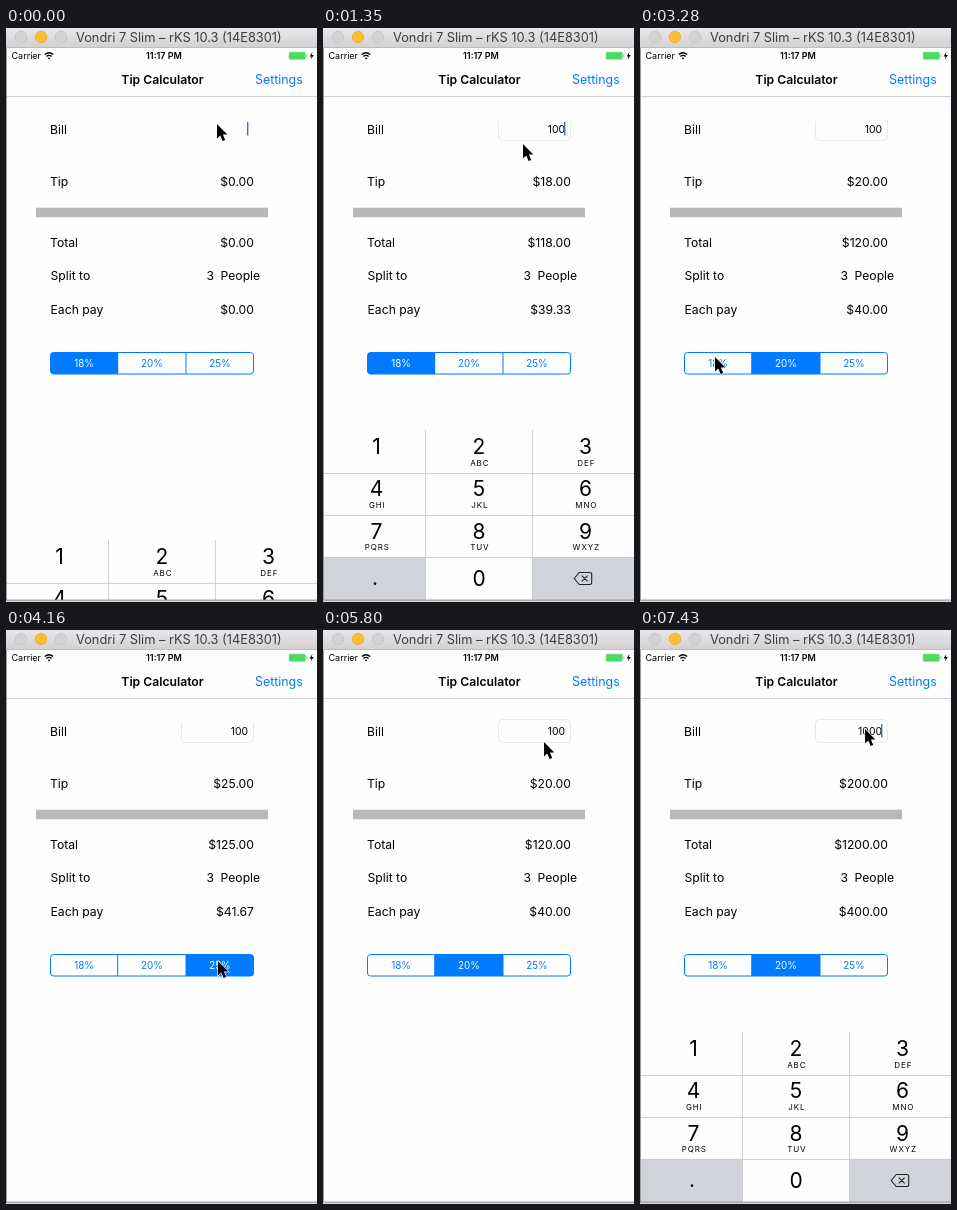
Recreate the animation shown at these times as an HTML page. Size 311x574 px, loop 8000 ms.

```html
<!DOCTYPE html>
<html lang="en">
<head>
<meta charset="utf-8">
<title>Tip Calculator</title>
<style>
  html, body { margin: 0; height: 100%; overflow: hidden; background: #fff; }
  svg { display: block; width: 100vw; height: 100vh; }
  text { font: 12.2px Inter, "Liberation Sans", sans-serif; fill: #000; white-space: pre; }
  .end { text-anchor: end; }
  .mid { text-anchor: middle; }
  text.bold { font-weight: 600; }
  text.digit { font-size: 21px; }
  text.letters { font-size: 8px; letter-spacing: .9px; }
  text.small { font-size: 9px; }
  text.seg { font-size: 9.8px; }
  .rule { stroke: #c6c6c9; stroke-width: .8; }
</style>
</head>
<body>
<svg viewBox="0 0 311 574">
  <defs>
    <linearGradient id="chrome" x2="0" y2="1">
      <stop stop-color="#e9e7e9"/><stop offset="1" stop-color="#d2d0d2"/>
    </linearGradient>
    <clipPath id="screen"><rect x="1" y="20" width="310" height="552"/></clipPath>
    <clipPath id="fieldClip"><rect id="fieldArea" width="80" height="40"/></clipPath>
    <clipPath id="segClip"><rect x="44.5" y="324.5" width="203" height="21.5" rx="3"/></clipPath>
  </defs>

  <rect width="311" height="574" fill="#fefefe"/>
  <rect width="311" height="19.5" fill="url(#chrome)"/>
  <path d="M0 19.5H311" stroke="#b5b3b5" stroke-width=".8"/>
  <g stroke-width=".6">
    <circle cx="15" cy="9" r="5.8" fill="#d4d2d4" stroke="#bebcbe"/>
    <circle cx="35" cy="9" r="5.8" fill="#fdbd30" stroke="#dfa023"/>
    <circle cx="55" cy="9" r="5.8" fill="#d4d2d4" stroke="#bebcbe"/>
  </g>
  <text x="70" y="14" style="font-size:12.8px;fill:#3f3f3f">Vondri 7 Slim – rKS 10.3 (14E8301)</text>

  <text class="small" x="5.5" y="31">Carrier</text>
  <g fill="none" stroke="#000" stroke-width="1.3">
    <path d="M38.8 26.6Q43 22.8 47.2 26.6M40.4 28.6Q43 26.2 45.6 28.6"/>
    <path d="M43 31.4L41.7 30Q43 29 44.3 30Z" fill="#000" stroke="none"/>
  </g>
  <text class="small mid bold" x="158" y="31">11:17 PM</text>
  <rect x="283" y="24" width="16.5" height="7.5" rx="1.3" fill="#4cd964" stroke="#a7dfb1" stroke-width=".6"/>
  <rect x="300.2" y="26.2" width="1.2" height="3" fill="#8fcf9b"/>
  <path d="M306.4 24L303.6 28.4H305.5L304.8 31.5L307.8 27H305.8Z"/>

  <text class="mid bold" x="156.5" y="56">Tip Calculator</text>
  <text x="249" y="56" style="font-size:12.4px;fill:#007aff">Settings</text>
  <path class="rule" d="M1 68.5H311"/>

  <text x="44" y="106">Bill</text>
  <text x="44" y="158">Tip</text>
  <text x="44" y="218.5">Total</text>
  <text x="44.5" y="251.5">Split to</text>
  <text x="44.5" y="286">Each pay</text>
  <text x="200.5" y="251.5">3</text>
  <text x="214.5" y="251.5">People</text>
  <rect x="30" y="179.7" width="232" height="9.6" fill="#b8b8b8"/>

  <rect x="175.5" y="89.5" width="72" height="23" rx="4" fill="none" stroke="#e9e9e9" clip-path="url(#fieldClip)"/>
  <text id="bill" class="end" x="242" y="104.5" style="font-size:10.4px"></text>
  <rect id="caret" x="241" y="94" width="1.4" height="13.5" fill="#426bd8"/>
  <text id="tip" class="end" x="248" y="158"></text>
  <text id="total" class="end" x="248" y="218.5"></text>
  <text id="each" class="end" x="248" y="285.5"></text>

  <g id="segments" clip-path="url(#segClip)"></g>
  <path d="M111.7 324.5V346M180 324.5V346" stroke="#007aff"/>
  <rect x="44.5" y="324.5" width="203" height="21.5" rx="3" fill="none" stroke="#007aff"/>

  <g clip-path="url(#screen)"><g id="keypad">
    <rect y="402" width="311" height="172" fill="#fefefe"/>
    <path d="M1 529.5H102.5V574H1ZM209.5 529.5H311V574H209.5Z" fill="#d1d4db"/>
    <path class="rule" fill="none" d="M1 445.5H311M1 487.5H311M1 529.5H311M102.5 402V574M209.5 402V574"/>
    <path d="M256.2 544.5H267Q268.7 544.5 268.7 546.2V554.8Q268.7 556.5 267 556.5H256.2L251.2 550.5ZM258.8 547.6L264.6 553.4M264.6 547.6L258.8 553.4" fill="none" stroke="#222" stroke-width="1.1" stroke-linejoin="round"/>
  </g></g>

  <path d="M.5 20V572" stroke="#9b9b9b"/>
  <rect y="571.6" width="311" height="1.2" fill="#8c8c8c"/>
  <rect y="572.8" width="311" height="1.2" fill="#d8d8d8"/>

  <path id="mouse" d="M0 0V14.5L3.3 11.4L5.6 17L8.2 15.9L5.9 10.6H10.3Z" stroke="#fff" stroke-width="1.2" paint-order="stroke"/>
</svg>
<script>
const LOOP = 8000, TICK = 148.7;
const RATES = [18, 20, 25];
const $ = id => document.getElementById(id);

function add(parent, tag, attrs, label = '') {
  const el = document.createElementNS('http://www.w3.org/2000/svg', tag);
  for (const name in attrs) el.setAttribute(name, attrs[name]);
  el.textContent = label;
  return parent.appendChild(el);
}

const segments = RATES.map((rate, i) => {
  const x = 44 + i * 68;
  return {
    box: add($('segments'), 'rect', { x, y: 324, width: 68, height: 23 }),
    label: add($('segments'), 'text', { class: 'seg mid', x: x + 34, y: 339 }, rate + '%')
  };
});

const LETTERS = ['', 'ABC', 'DEF', 'GHI', 'JKL', 'MNO', 'PQRS', 'TUV', 'WXYZ'];
const columnX = [53.5, 156, 262.5];
LETTERS.forEach((letters, i) => {
  const x = columnX[i % 3], y = 426 + Math.floor(i / 3) * 42.3;
  add($('keypad'), 'text', { class: 'digit mid', x, y }, i + 1);
  add($('keypad'), 'text', { class: 'letters mid', x: x + .8, y: y + 11.6 }, letters);
});
add($('keypad'), 'text', { class: 'digit mid', x: 156, y: 558 }, '0');
add($('keypad'), 'text', { class: 'digit mid', x: 52, y: 556.5 }, '.');

// Keys are [tick, value, ...]; stepped tracks hold, the mouse moves linearly.
const bills = [[0, ''], [3, '1'], [4, '10'], [5, '100'], [48, '1000']];
const selected = [[0, 0], [18, 1], [24, 0], [28, 2], [34, 0], [36, 1]];
const pressed = [[0, -1], [17, 1], [18, -1], [23, 0], [24, -1], [27, 2], [28, -1], [33, 0], [34, -1], [35, 1], [36, -1]];
const keypadDrop = [[0, 110], [1, 12], [2, 0], [14, 159], [15, 172], [43, 10], [44, 0]];
const carets = [[0, 1], [10, 0], [43, 1]];
const fieldAreas = [[0, 175, 120], [1, 175, 93], [30, 180, 93], [38, 175, 89]];
const mouse = [[0, 211, 96], [8, 211, 96], [9, 200, 116], [12, 150, 224], [13, 150, 224], [14, 141, 285],
  [16, 146, 334], [21, 146, 334], [22, 75, 329], [24, 75, 329], [27, 212, 331], [29, 212, 331],
  [31, 150, 364], [33, 76, 334], [34, 76, 334], [35, 147, 338], [36, 147, 338], [37, 190, 225],
  [38, 207, 160], [39, 221, 112], [40, 225, 99]];

const held = (track, tick) => track.filter(key => key[0] <= tick).pop();

function position(tick) {
  const a = held(mouse, tick);
  const b = mouse.find(key => key[0] > tick) || a;
  const f = (tick - a[0]) / (b[0] - a[0] || 1);
  return [a[1] + (b[1] - a[1]) * f, a[2] + (b[2] - a[2]) * f];
}

function draw() {
  const tick = Math.floor((performance.now() % LOOP) / TICK + .05);
  const bill = held(bills, tick)[1];
  const choice = held(selected, tick)[1];
  const press = held(pressed, tick)[1];
  const tip = bill * RATES[choice] / 100;
  const total = +bill + tip;

  $('bill').textContent = bill;
  Object.entries({ tip, total, each: total / 3 }).forEach(([id, sum]) => {
    $(id).textContent = '$' + sum.toFixed(2);
  });
  segments.forEach(({ box, label }, i) => {
    box.style.fill = i === choice ? '#007aff' : i === press ? '#d6e8fd' : '#fefefe';
    label.style.fill = i === choice ? '#fff' : '#007aff';
  });

  const [, x, y] = held(fieldAreas, tick);
  $('fieldArea').setAttribute('x', x);
  $('fieldArea').setAttribute('y', y);
  $('caret').style.opacity = held(carets, tick)[1];
  $('keypad').setAttribute('transform', `translate(0 ${held(keypadDrop, tick)[1]})`);
  $('mouse').setAttribute('transform', `translate(${position(tick)})`);
  requestAnimationFrame(draw);
}
draw();
</script>
</body>
</html>
```
